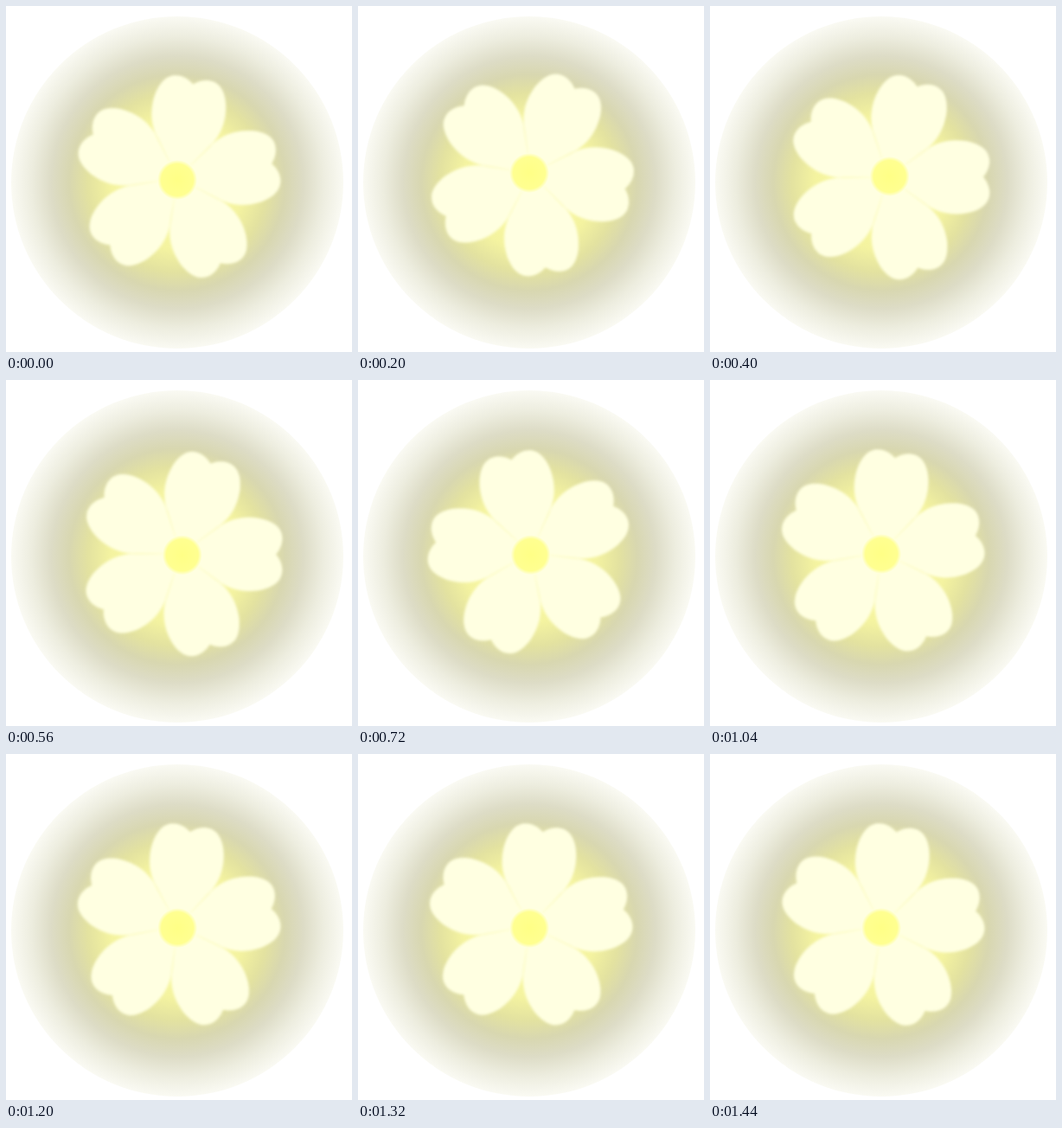
These frames come from a looping animation (400x400 px, 1.48 s). An HTML page:

```html
<!DOCTYPE html>
<html lang="en">
<head>
<meta charset="utf-8">
<title>Spinning flower</title>
<style>
  html, body { margin: 0; width: 100%; height: 100%; overflow: hidden; background: #fff; }
  svg { display: block; width: 100vw; height: 100vh; }
  .petals { fill: #ffffe1; filter: blur(1.4px); }
</style>
</head>
<body>
<svg viewBox="0 0 400 400">
  <defs>
    <radialGradient id="glow">
      <stop offset="0" stop-color="#ffff9c"/>
      <stop offset=".4" stop-color="#f4f3a0"/>
      <stop offset=".54" stop-color="#e3e2a0"/>
      <stop offset=".65" stop-color="#d8d7b0"/>
      <stop offset=".76" stop-color="#dddcc6"/>
      <stop offset=".88" stop-color="#ededdf"/>
      <stop offset="1" stop-color="#fafaf3"/>
    </radialGradient>
    <radialGradient id="core">
      <stop offset="0" stop-color="#ffff86"/>
      <stop offset=".8" stop-color="#ffff90"/>
      <stop offset="1" stop-color="#ffffe1"/>
    </radialGradient>
    <path id="petal" d="M0 0L-30-42C-47-62-45-94-35-108C-28-119-13-121 0-110C13-121 28-119 35-108C45-94 47-62 30-42Z"/>
  </defs>
  <circle cx="198" cy="204" r="192" fill="url(#glow)"/>
  <g id="flower">
    <g class="petals" transform="translate(-3.5 2) rotate(9.3)">
      <use href="#petal"/>
      <use href="#petal" transform="rotate(72)"/>
      <use href="#petal" transform="rotate(144)"/>
      <use href="#petal" transform="rotate(216)"/>
      <use href="#petal" transform="rotate(288)"/>
    </g>
    <circle cx="-4" cy="4" r="23" fill="url(#core)"/>
  </g>
</svg>
<script>
  const LOOP = 1480, STEP = 40;
  // time (ms), angle (deg), speed (deg/ms)
  const keys = [
    [0, 0, .1],
    [200, 90, .65],
    [400, 224.5, .6],
    [560, 297, .33],
    [920, 359.1, 0],
    [1200, 358.2, 0],
    [1480, 360, .01]
  ];

  // Cubic Hermite curve through the keys
  function angleAt(t) {
    const i = keys.findIndex(k => k[0] > t);
    const [t0, a0, v0] = keys[i - 1], [t1, a1, v1] = keys[i];
    const d = t1 - t0, u = (t - t0) / d, w = 1 - u;
    return a0 * w * w * (1 + 2 * u) + v0 * d * u * w * w
         + a1 * u * u * (3 - 2 * u) - v1 * d * u * u * w;
  }

  const flower = document.getElementById('flower');
  const start = performance.now();

  function draw() {
    const t = (performance.now() - start) % LOOP;
    const angle = angleAt(Math.floor(t / STEP) * STEP);
    flower.setAttribute('transform', `translate(202 197) rotate(${angle.toFixed(3)})`);
    requestAnimationFrame(draw);
  }
  draw();
</script>
</body>
</html>
```
